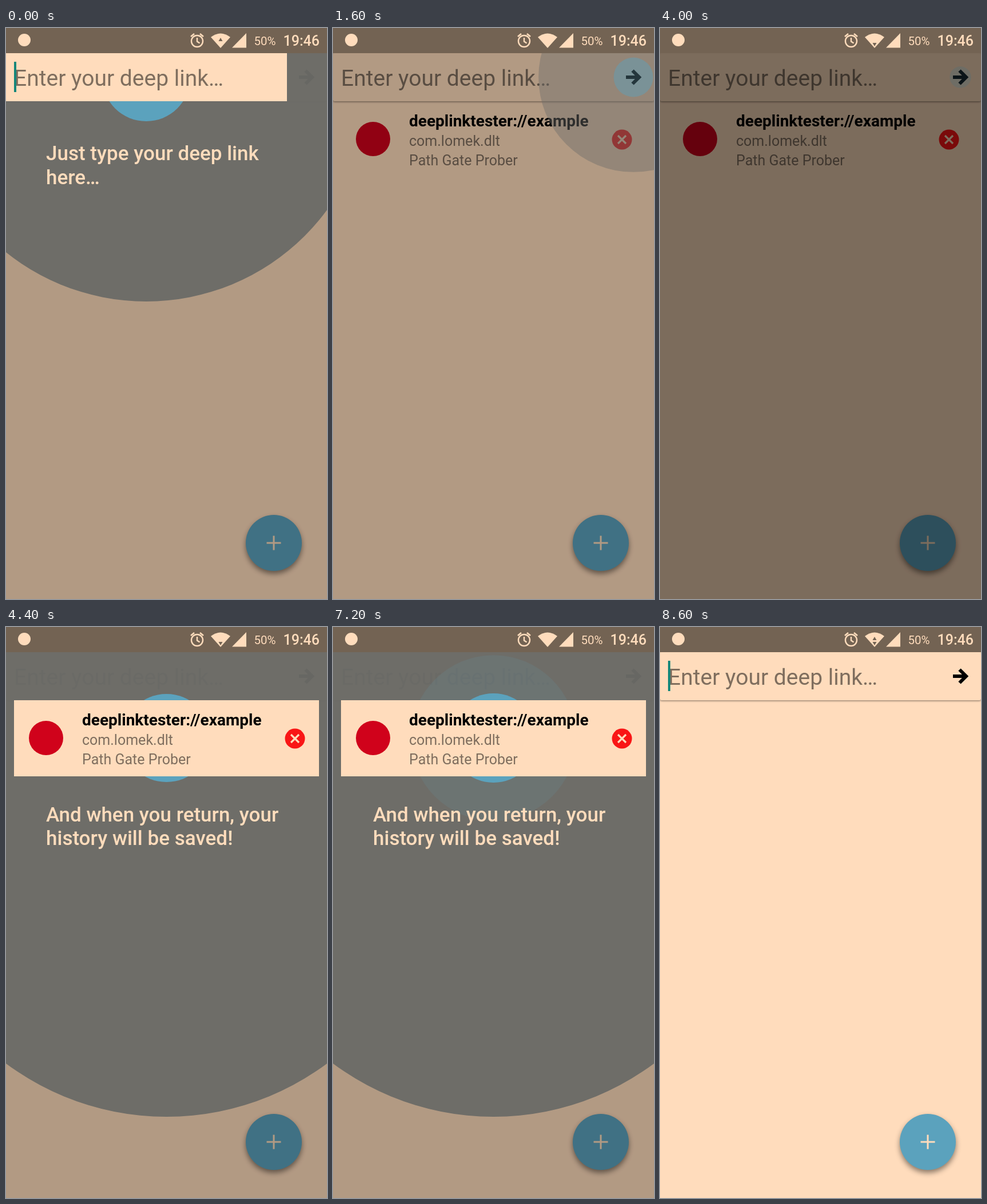
Animation, 561 px wide and 998 px high, one loop 8800 ms. Source, as an HTML page with a canvas:

```html
<!DOCTYPE html>
<html lang="en">
<head>
<meta charset="utf-8">
<title>Deep link walkthrough</title>
<style>
  html, body { margin: 0; width: 100%; height: 100%; overflow: hidden; background: #ffdcbc; }
  canvas { display: block; }
</style>
</head>
<body>
<canvas id="stage" width="561" height="998"></canvas>
<script>
const ctx = document.getElementById('stage').getContext('2d');
const W = 561, H = 998, LOOP = 8800, STEP = 200;
const CREAM = '#ffdcbc', BLUE = '#5ba2bd', HINT = '#7f6e5e', SCRIM = '#6c6c68', BAR = '#736353';
const FOCUS = 77, FADE = 250, PULSE = 1000;

const clamp = v => Math.max(0, Math.min(1, v));
const ease = v => 0.5 - 0.5 * Math.cos(Math.PI * clamp(v));

function circle(x, y, r, color, alpha = 1) {
  if (r <= 0 || alpha <= 0) return;
  ctx.globalAlpha = alpha;
  ctx.fillStyle = color;
  ctx.beginPath();
  ctx.arc(x, y, r, 0, 7);
  ctx.fill();
  ctx.globalAlpha = 1;
}

function rect(x, y, w, h, color) {
  ctx.fillStyle = color;
  ctx.fillRect(x, y, w, h);
}

function text(str, x, y, size, color, weight = 400) {
  ctx.font = `${weight} ${size}px Roboto, sans-serif`;
  ctx.fillStyle = color;
  ctx.fillText(str, x, y);
}

function fill(d, color) {
  ctx.fillStyle = color;
  ctx.fill(new Path2D(d));
}

function stroke(d, color, width) {
  ctx.strokeStyle = color;
  ctx.lineWidth = width;
  ctx.stroke(new Path2D(d));
}

function withShadow(blur, dy, alpha, draw) {
  ctx.save();
  ctx.shadowColor = `rgba(0,0,0,${alpha})`;
  ctx.shadowBlur = blur;
  ctx.shadowOffsetY = dy;
  draw();
  ctx.restore();
}

function input(cursor) {
  text('Enter your deep link…', 14, 101, 39, HINT);
  if (cursor) rect(14, 59, 4, 53, '#16877a');
}

function arrow() {
  stroke('M512 86H534M523.5 74.5L535 86L523.5 97.5', '#000', 6);
}

function historyItem() {
  fillIcon();
  text('deeplinktester://example', 133, 172, 28, '#000', 700);
  text('com.lomek.dlt', 133, 206, 25, HINT);
  text('Path Gate Prober', 133, 240, 25, HINT);
  const a = ctx.globalAlpha;
  circle(505, 195, 17.5, '#f91616', a);
  ctx.globalAlpha = a;
  stroke('M498 188l14 14M512 188l-14 14', CREAM, 3.2);
}

function fillIcon() {
  const a = ctx.globalAlpha;
  circle(70, 194, 30, '#d0021b', a);
  ctx.globalAlpha = a;
}

function app(t) {
  rect(0, 0, W, H, CREAM);
  withShadow(3, 1.5, 0.4, () => {
    ctx.fillStyle = CREAM;
    ctx.beginPath();
    ctx.roundRect(0, 44, W, 84, 3);
    ctx.fill();
  });
  input(t >= 7600 && (t < 8000 || t >= 8600));
  arrow();
  if (t >= 1400 && t < 7600) historyItem();
  withShadow(10, 5, 0.45, () => circle(468, 900, 49, BLUE));
  stroke('M455.5 900h25M468 887.5v25', CREAM, 3);
}

// Each showcase: dim interval, expand start, dismiss start, target, scrim circle, caption.
const showcases = [
  { on: -200, open: -270, close: 1232, off: 1550, x: 245, y: 86, scrim: [245, 86, 392],
    lines: ['Just type your deep link', 'here…'], textY: 231,
    view() { rect(0, 44, 491, 84, CREAM); input(true); } },
  { on: 1100, open: 1508, close: 3832, off: 4150, x: 525, y: 86, scrim: [525, 86, 555.5],
    lines: ['Launch the deep link…'], textY: 231,
    view: arrow },
  { on: 3700, open: 4108, close: 7232, off: 7500, x: 280.5, y: 194, scrim: [280.5, 386.5, 469.5],
    lines: ['And when you return, your', 'history will be saved!'], textY: 339.5,
    view() { rect(14, 128, 533, 133, CREAM); historyItem(); } }
];

function showcase(s, t) {
  if (t < s.on || t >= s.off) return;
  rect(0, 0, W, H, 'rgba(0,0,0,.3)');
  const open = ease((t - s.open) / FADE), close = ease((t - s.close) / FADE);
  if (!open || close === 1) return;

  const leave = Math.min(1, close * 2);
  const [sx, sy, sr] = s.scrim;
  const grow = Math.min(1, open * 1.5);
  circle(sx, sy, sr * open * (1 + 0.2 * leave), SCRIM, 0.96 * grow * (1 - leave));

  let radius = FOCUS * grow * (1 - close);
  const since = t - s.open - FADE;
  if (since > 0 && !close) {
    const p = ease(since % PULSE / PULSE);
    const ring = Math.max(0, p - 0.5) * 2;
    radius += FOCUS * 0.1 * (1 - Math.abs(2 * p - 1));
    if (ring) circle(s.x, s.y, FOCUS * (1 + ring), BLUE, 1 - ring);
  }
  const alpha = grow * (1 - close);
  circle(s.x, s.y, radius, BLUE, alpha);

  ctx.globalAlpha = alpha;
  s.view();
  ctx.globalAlpha = clamp((open - 0.7) / 0.3) * (1 - leave);
  s.lines.forEach((line, i) => text(line, 70, s.textY + i * 41.5, 35, CREAM, 500));
  ctx.globalAlpha = 1;
}

function statusBar(t) {
  rect(0, 0, W, 44, BAR);
  circle(32, 21, 11, CREAM);
  stroke('M344 23a10 10 0 1 1-20 0a10 10 0 1 1 20 0M334 17v6.5l4.5 3', CREAM, 2.4);
  stroke('M323 15l6-5M345 15l-6-5', CREAM, 2.6);
  fill('M358 16Q375 3 392 16L375 35Z', CREAM);
  if (t < 1400 || t >= 7600) fill('M371.5 23h7l-3.5-6z', BAR);
  if (t >= 3600 && t <= 5000 || t >= 7600) fill('M371.5 26h7l-3.5 6z', BAR);
  fill('M395 34.5H420V9Z', CREAM);
  text('50%', 433.5, 30, 20.5, CREAM);
  text('19:46', 484.5, 31, 25, CREAM, 500);
}

function frame(now) {
  const t = Math.floor(now % LOOP / STEP) * STEP;
  app(t);
  showcases.forEach(s => showcase(s, t));
  statusBar(t);
  requestAnimationFrame(frame);
}

let start;
requestAnimationFrame(function begin(now) {
  start = now;
  (function tick(time) {
    frameAt(time - start);
    requestAnimationFrame(tick);
  })(now);
});

function frameAt(elapsed) {
  const t = Math.floor(Math.max(0, elapsed) % LOOP / STEP) * STEP;
  app(t);
  showcases.forEach(s => showcase(s, t));
  statusBar(t);
}
</script>
</body>
</html>
```
